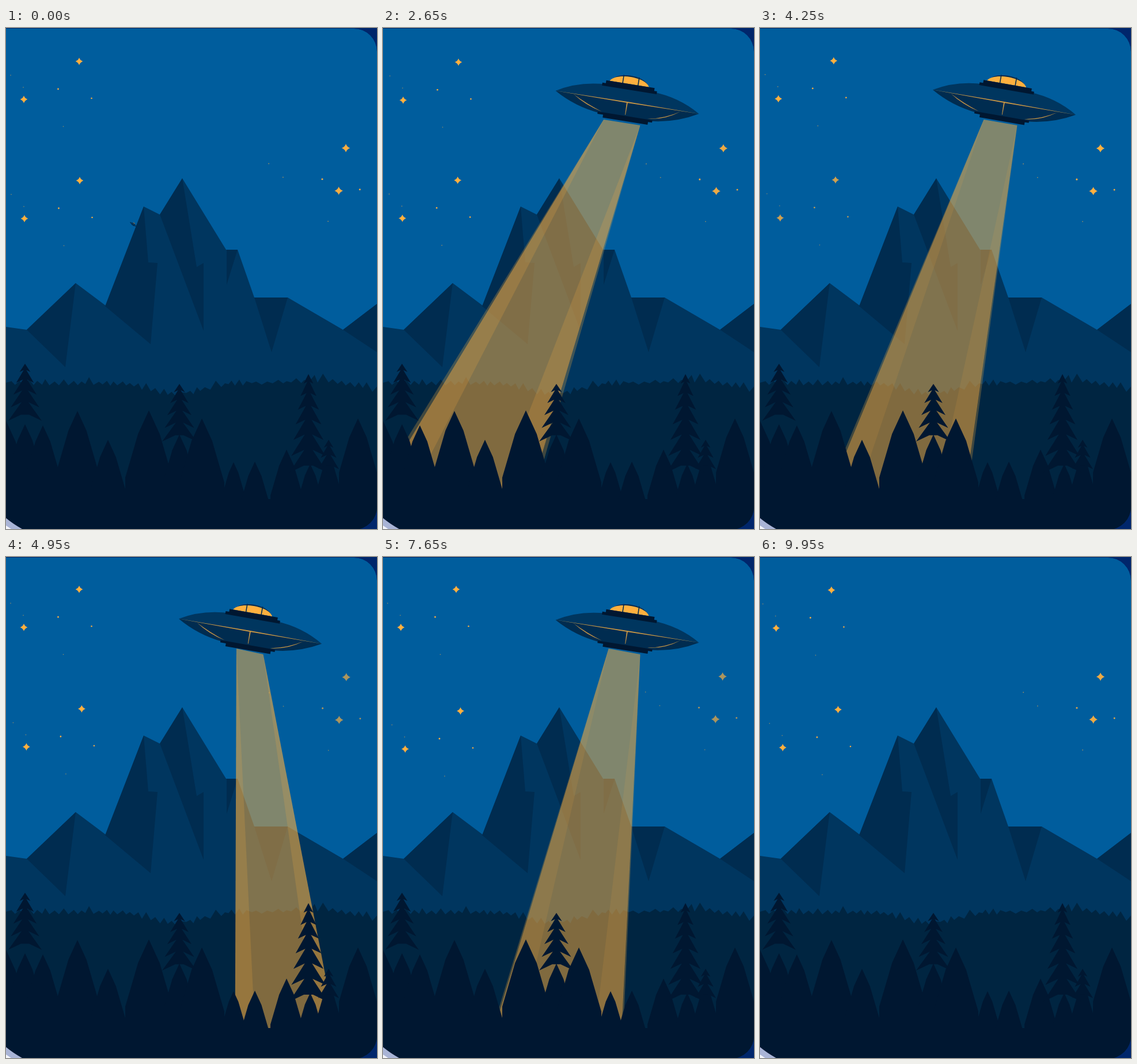
Animation, 644 px wide and 870 px high, one loop 10000 ms. Source, as an HTML page with a canvas:

```html
<!DOCTYPE html>
<html lang="en">
<head>
<meta charset="utf-8">
<title>Night visitor</title>
<style>
html, body { margin: 0; width: 100%; height: 100%; overflow: hidden; background: #00266b; }
canvas { display: block; width: 644px; height: 870px; }
</style>
</head>
<body>
<canvas id="stage" width="644" height="870"></canvas>
<script>
const ctx = document.getElementById('stage').getContext('2d');
const W = 644, H = 870, LOOP = 10000, TAU = 2 * Math.PI;
const PAGE = '#00266b', SKY = '#005d9d', SLOPE = '#00365f', SHADE = '#002c50',
      WOODS = '#002541', NIGHT = '#001731', GLOW = '#ffb03f', TRIM = '#c99544';

const clamp01 = v => Math.max(0, Math.min(1, v));
const mix = (a, b, u) => a + (b - a) * u;
const smooth = u => u * u * (3 - 2 * u);
const easeInOut = u => u < .5 ? 2 * u * u : 1 - 2 * (1 - u) ** 2;
const wave = (t, peak, period) => Math.cos((t - peak) / period * TAU);
const fill = (path, color) => { ctx.fillStyle = color; ctx.fill(path); };

// Smooth steps between a few [time, ...values] keys.
function tween(keys, t) {
  const i = keys.findIndex(k => k[0] > t);
  if (i < 0) return keys[keys.length - 1].slice(1);
  const a = keys[Math.max(0, i - 1)], b = keys[i];
  const u = smooth(clamp01((t - a[0]) / (b[0] - a[0] || 1)));
  return a.slice(1).map((v, n) => mix(v, b[n + 1], u));
}

function polygon(points) {
  const p = new Path2D();
  points.forEach(([x, y]) => p.lineTo(x, y));
  p.closePath();
  return p;
}

// ---- Landscape ----
const mountains = new Path2D('M0 519L36 524 121 443 173 482 239 310 267 324 306 261 382 385H402L431 468H489L585 524 644 479V870H0Z');
const shades = new Path2D('M36 524L121 443 103 589Z M172 483L239 310 247 407 263 408 251 549Z' +
  'M267 324L306 261 331 415 343 408V526Z M383 385H402L383 446Z M431 468H489L461 563Z M585 524L644 479V563Z');

function ridge() {
  let seed = 7;
  const random = () => (seed = seed * 16807 % 2147483647) / 2147483647;
  const bump = (x, center, width) => Math.exp(-(((x - center) / width) ** 2));
  const points = [[0, H]];
  for (let x = 0, tip = false; x < W + 12; x += 5 + random() * 5, tip = !tip) {
    const base = 616 + 19 * bump(x, 295, 62) + 16 * bump(x, 660, 50) - 5 * bump(x, 550, 40);
    points.push([x, tip ? base - 2 - 9 * random() ** 2 : base + 5 * random()]);
  }
  return polygon([...points, [W, H]]);
}

// A plain fir: a narrow cap on a skirt that runs down to the ground.
function fir([x, top, half]) {
  const profile = [[.46, .35], [.55, .46], [1, 1]].map(([w, h]) => [w * half, top + h * half * 2.85]);
  profile.push([half, H]);
  return polygon([[x, top], ...profile.map(([w, y]) => [x + w, y]),
    ...profile.reverse().map(([w, y]) => [x - w, y])]);
}

// A spruce: tiers of pointed branches, wider and further apart towards the ground.
function spruce([x, top, height, half, tiers]) {
  const side = [];
  for (let i = 1; i <= tiers; i++) {
    const f = i / tiers, w = half * f ** .7, y = top + height * f ** 1.2;
    side.push([w, y], [w * .24, y - w * .36]);
  }
  return polygon([[x, top], ...side.map(([w, y]) => [x + w, y]),
    ...side.reverse().map(([w, y]) => [x - w, y])]);
}

const woods = ridge();
const firs = [[0, 682, 36], [33, 688, 28], [64, 690, 28], [124, 665, 34], [177, 715, 30], [248, 664, 41],
  [301, 706, 27], [340, 678, 39], [395, 754, 18], [432, 753, 25], [487, 732, 28], [528, 757, 20],
  [560, 742, 20], [611, 678, 33]].map(fir);
const spruces = [[33, 583, 99, 29, 5], [301, 618, 100, 30, 5], [525, 601, 171, 33, 7], [560, 715, 51, 18, 3]].map(spruce);

// ---- Stars ----
const star = new Path2D('M0-6.4Q1.7-1.7 6.4 0 1.7 1.7 0 6.4-1.7 1.7-6.4 0-1.7-1.7 0-6.4Z');
const dust = [[-119, 24, .8], [-97, 45, .8], [-36.5, 48, 1.4], [21.5, 64, 1.3], [-27.5, 113, .8]];
const clusters = [
  { size: 1, mateX: -96, dim: 5950, drift: [[0, 127, 58], [2600, 131, 59.3], [5000, 127, 56.2], [7650, 127, 56.2], [9950, 124, 57.5]] },
  { size: 1, mateX: -96, dim: 1300, drift: [[0, 128, 265], [5500, 131.5, 263.7], [7650, 134.5, 267.5], [9950, 135.5, 265]] },
  { size: 1.125, mateX: -11, dim: 7650, drift: [[0, 590, 208.5], [3700, 591, 209], [7650, 589.5, 207.5], [9950, 591, 208]] }
];

function drawStars(t) {
  for (const { size, mateX, dim, drift } of clusters) {
    const alpha = 1 - .33 * Math.max(0, wave(t, dim, 2700)) ** 3;
    ctx.save();
    ctx.translate(...tween(drift, t));
    ctx.scale(size, size);
    ctx.globalAlpha = alpha;
    fill(star, GLOW);
    for (const [x, y, r] of dust) {
      ctx.globalAlpha = alpha * (r < 1 ? .6 : .95);
      ctx.beginPath();
      ctx.arc(x, y, r, 0, TAU);
      ctx.fill();
    }
    ctx.globalAlpha = alpha;
    ctx.translate(mateX, 66);
    fill(star, GLOW);
    ctx.restore();
  }
}

// ---- Saucer ----
const hullTop = new Path2D('M-126 0Q-88-23-40-25H40Q88-23 126 0Z');
const hullBase = new Path2D('M-126 0Q-88 22-44 26H44Q88 22 126 0Z');
const bands = new Path2D('M-42-32H43V-27H48V-22H-48V-27H-42Z M-48 24H48V28H41V33H-38V28H-48Z');
const dome = new Path2D('M-34-32C-28-51 25-52 32-32Z');
const cabin = new Path2D('M-36-32C-28-48 25-49 33-32Z');
const trim = new Path2D('M-126 0L0-1.1 126 0 0 1.1Z M-94 1Q-70 17-41 23Q-69 14-94 1Z M94 1Q70 17 39 23Q69 20 94 1Z M-1 0H1L.4 22H-.4Z');

const hover = { x: 424, y: 129 };
const arrival = { from: 0, to: 1700, far: { x: 221, y: 341 }, bend: { x: 90, y: 420 }, tilt: 35, hidden: .2 };
const departure = { from: 9450, to: 8450, far: { x: 325, y: 330 }, bend: { x: 520, y: 280 }, tilt: -20, hidden: .4 };

function saucerPose(t) {
  const leg = t < 5000 ? arrival : departure;
  const u = easeInOut(clamp01((t - leg.from) / (leg.to - leg.from)));
  const along = axis => mix(mix(leg.far[axis], leg.bend[axis], u), mix(leg.bend[axis], hover[axis], u), u);
  return {
    x: along('x'), y: along('y'), scale: mix(.06, 1, u),
    tilt: mix(leg.tilt, 9.5 + .5 * wave(t, 4800, 5700), u),
    behind: u < leg.hidden, gone: t > departure.from
  };
}

function drawSaucer({ x, y, scale, tilt }) {
  ctx.save();
  ctx.translate(x, y);
  ctx.rotate(tilt * TAU / 360);
  ctx.scale(scale, scale);
  fill(dome, SHADE);
  fill(cabin, GLOW);
  ctx.fillStyle = SHADE;
  for (const mx of [-14, 13]) ctx.fillRect(mx, -46, 1.6, 15);
  fill(hullTop, SLOPE);
  fill(hullBase, SHADE);
  fill(bands, NIGHT);
  fill(trim, TRIM);
  ctx.restore();
}

// ---- Beam: the lean is the sideways run per pixel of depth ----
const aim = [[3950, -.452], [4750, .095], [5150, .095], [5850, -.175]];

function drawBeam(t) {
  const reach = Math.min(clamp01((t - 1800) / 340), clamp01((8400 - t) / 350));
  if (reach <= 0) return;
  const [lean] = tween(aim, t);
  const spread = .108 - .1 * lean, inset = .0585 - .068 * lean, halo = .025 * Math.max(0, -lean);
  const floor = 165 + 660 * reach;
  const leftTop = [397 + 31 * lean, 159], rightTop = [446.5, 169];
  const land = ([x, y], slope) => [x + slope * (floor - y), floor];
  const strip = (a, slopeA, b, slopeB, alpha) => {
    ctx.globalAlpha = alpha;
    fill(polygon([a, b, land(b, slopeB), land(a, slopeA)]), GLOW);
  };
  const edges = [[leftTop, -1], [rightTop, 1]];
  const pulse = .14 + .04 * wave(t, 3700, 1125);
  strip(leftTop, lean - spread, rightTop, lean + spread, .5);
  for (const [top, side] of edges) {
    const outer = lean + side * spread;
    strip(top, outer, top, outer - side * inset, pulse);
    strip(top, outer, top, outer + side * halo, .25);
  }
  ctx.globalAlpha = 1;
}

// ---- Scene ----
const card = new Path2D();
card.roundRect(0, 1, W, H, [0, 40, 40, 0]);
const corner = new Path2D('M0 851Q12 861 28 870H0Z');
const cornerLight = new Path2D('M0 864L9 870H0Z');

function draw(t) {
  const saucer = saucerPose(t);
  ctx.fillStyle = PAGE;
  ctx.fillRect(0, 0, W, H);
  ctx.save();
  ctx.clip(card);
  fill(card, SKY);
  drawStars(t);
  if (saucer.behind && !saucer.gone) drawSaucer(saucer);
  fill(mountains, SLOPE);
  fill(shades, SHADE);
  fill(woods, WOODS);
  drawBeam(t);
  for (const tree of [...firs, ...spruces]) fill(tree, NIGHT);
  ctx.fillRect(0, 818, W, H);
  if (!saucer.behind) drawSaucer(saucer);
  fill(corner, '#a9b4d6');
  fill(cornerLight, '#f4f6fc');
  ctx.restore();
}

const start = performance.now();
function tick() {
  draw((performance.now() - start) % LOOP);
  requestAnimationFrame(tick);
}
tick();
</script>
</body>
</html>
```
